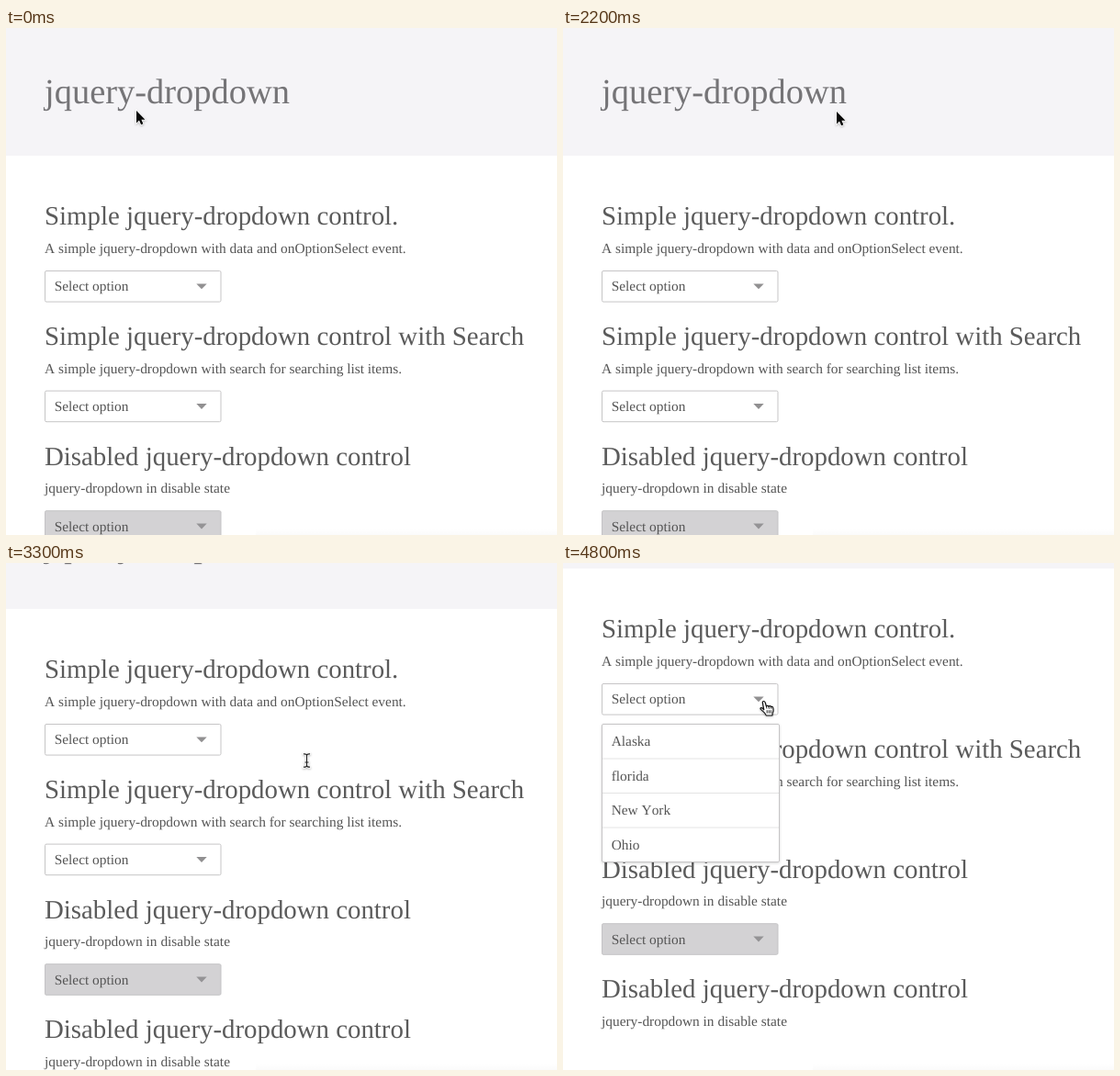
An HTML page that plays this animation: 600x552 px, repeating every 5 s.

```html
<!DOCTYPE html>
<html lang="en">
<head>
<meta charset="utf-8">
<title>jquery-dropdown</title>
<style>
  html, body { margin: 0; width: 100%; height: 100%; overflow: hidden; background: #fff; }
  svg { display: block; width: 600px; height: 552px; }
  text {
    font-family: "Liberation Serif", Times, serif;
    font-size: 15.385px;
    font-kerning: none;
    text-rendering: geometricPrecision;
    fill: #555;
  }
  .title { font-size: 38.46px; fill: #757477; }
  .heading { font-size: 28.85px; fill: #5b5b5b; }
  .box { fill: #fff; stroke: #c6c5c6; }
  .disabled .box { fill: #d3d2d4; stroke: #c4c3c5; }
  .caret { fill: #919091; }
  .disabled .caret { fill: #949395; }
  .rule { stroke: #e4e4e4; }
  #list { filter: drop-shadow(0 1px 1.5px rgba(0, 0, 0, .16)); }
  .cursor { filter: drop-shadow(0 1px 1px rgba(0, 0, 0, .25)); }
</style>
</head>
<body>
<svg viewBox="0 0 600 552">
  <defs>
    <linearGradient id="fade" x2="0" y2="1">
      <stop offset="0" stop-opacity="0"/>
      <stop offset="1" stop-opacity=".016"/>
    </linearGradient>
  </defs>
  <g id="page">
    <rect y="-10" width="600" height="149" fill="#f5f4f7"/>
    <text class="title" x="42" y="82">jquery-dropdown</text>
    <g id="sections"></g>
    <g id="list"></g>
  </g>
  <rect x="272" y="545" width="328" height="7" fill="url(#fade)"/>
  <g id="pointer">
    <path class="cursor" id="arrow" d="M0 0V13.4L3 10.6 5.1 15.2 7.4 14.2 5.4 9.7H9.5Z"
      fill="#080808" stroke="#fff" stroke-width="1.6" paint-order="stroke"/>
    <g class="cursor" id="beam" fill="none" stroke-linecap="square">
      <path id="stem" d="M-3-7.2Q0-7.2 0-5.2Q0-7.2 3-7.2M0-5.2V5.2M-3 7.2Q0 7.2 0 5.2Q0 7.2 3 7.2M-1.5 2H1.5"
        stroke="#fff" stroke-width="2.6"/>
      <use href="#stem" stroke="#222"/>
      <path d="M-3-7.2Q0-7.2 0-5.2Q0-7.2 3-7.2M0-5.2V5.2M-3 7.2Q0 7.2 0 5.2Q0 7.2 3 7.2M-1.5 2H1.5"
        stroke="#222" stroke-width="1.2"/>
    </g>
    <g class="cursor" id="hand" stroke="#111" stroke-linejoin="round" stroke-linecap="round">
      <path d="M1.8 9.8L.4 2.4Q.1.6 1.4.5T3.2 2L4.4 6Q5.8 4.6 7 6.2 8.4 5 9.5 6.6
        11.4 5.8 11.8 8Q12.4 11 11.2 13.2L10.9 16H4.2Q3.8 14-1.6 9.4-2.6 8-1.4 7.6T1.8 9.8Z"
        fill="#fff" stroke-width="1.2"/>
      <path d="M4.4 6L4.9 8.2M7 6.2L7.4 8.4M9.5 6.6L9.8 8.4M5.2 10.6V13.2M7.3 10.6V13.2M9.3 10.6V13.2"
        fill="none" stroke-width=".9"/>
    </g>
  </g>
</svg>
<script>
  const LOOP = 5000, TICK = 100, PITCH = 130.6, ROW = 37.5;
  const byId = id => document.getElementById(id);

  const select = `
    <rect class="box" x="42.5" y="264.5" width="191.5" height="33.6" rx="1.5"/>
    <text x="52.7" y="286.4">Select option</text>
    <path class="caret" d="M207.3 278.4H218.7L213 284.3Z"/>`;

  const section = ([heading, note, kind], i) => `
    <g class="${kind}" transform="translate(0 ${i * PITCH})">
      <text class="heading" x="42" y="214.4">${heading}</text>
      <text x="42" y="245">${note}</text>
      ${kind === "last" ? "" : select}
    </g>`;

  byId("sections").innerHTML = [
    ["Simple jquery-dropdown control.", "A simple jquery-dropdown with data and onOptionSelect event.", "enabled"],
    ["Simple jquery-dropdown control with Search", "A simple jquery-dropdown with search for searching list items.", "enabled"],
    ["Disabled jquery-dropdown control", "jquery-dropdown in disable state", "disabled"],
    ["Disabled jquery-dropdown control", "jquery-dropdown in disable state", "last"]
  ].map(section).join("");

  const option = (name, i) => `
    <text x="52.7" y="${332.2 + i * ROW}">${name}</text>
    ${i ? `<path class="rule" d="M43 ${308.5 + i * ROW}H235"/>` : ""}`;

  byId("list").innerHTML =
    `<rect class="box" x="42.5" y="308.5" width="193" height="150" rx="1.5"/>` +
    ["Alaska", "florida", "New York", "Ohio"].map(option).join("");

  // Scroll offset per tick, with a small overshoot at the end of the page.
  const SCROLL_START = 2900;
  const scrolls = [16, 32, 51, 70, 89, 111, 127, 134, 135, 134, 133.5, 133];

  // Pointer stops: time, x, y and, when it changes, the shape.
  const stops = [
    [0, 142, 90, "arrow"], [100, 137, 89], [200, 118, 86], [300, 92, 80], [400, 68, 73], [500, 51, 68], [600, 44, 66],
    [700, 42, 66], [800, 39, 65], [900, 34, 61], [1000, 32, 59],
    [1200, 40, 60], [1300, 80, 62], [1400, 145, 65], [1500, 215, 66], [1600, 265, 67], [1700, 283, 67], [1800, 284, 68],
    [2200, 298, 91], [2300, 322, 128], [2400, 337, 170], [2500, 331, 207, "beam"], [2600, 327.5, 215],
    [3500, 322, 213, "arrow"], [3600, 296, 200], [3700, 260, 182], [3800, 232, 166],
    [3900, 218, 151, "hand"], [4000, 217, 150]
  ];

  function draw(time) {
    const now = Math.floor(time % LOOP / TICK) * TICK;
    const step = Math.min((now - SCROLL_START) / TICK, scrolls.length - 1);
    const offset = step < 0 ? 0 : scrolls[step];
    byId("page").setAttribute("transform", `translate(0 ${-offset})`);

    const past = stops.filter(stop => stop[0] <= now);
    const [, x, y] = past[past.length - 1];
    const shape = past.filter(stop => stop[3]).pop()[3];
    byId("pointer").setAttribute("transform", `translate(${x} ${y})`);
    for (const id of ["arrow", "beam", "hand"]) {
      byId(id).style.display = id === shape ? "" : "none";
    }
    byId("list").style.display = now >= 4800 ? "" : "none";
  }

  function loop() {
    draw(performance.now());
    requestAnimationFrame(loop);
  }
  loop();
</script>
</body>
</html>
```
